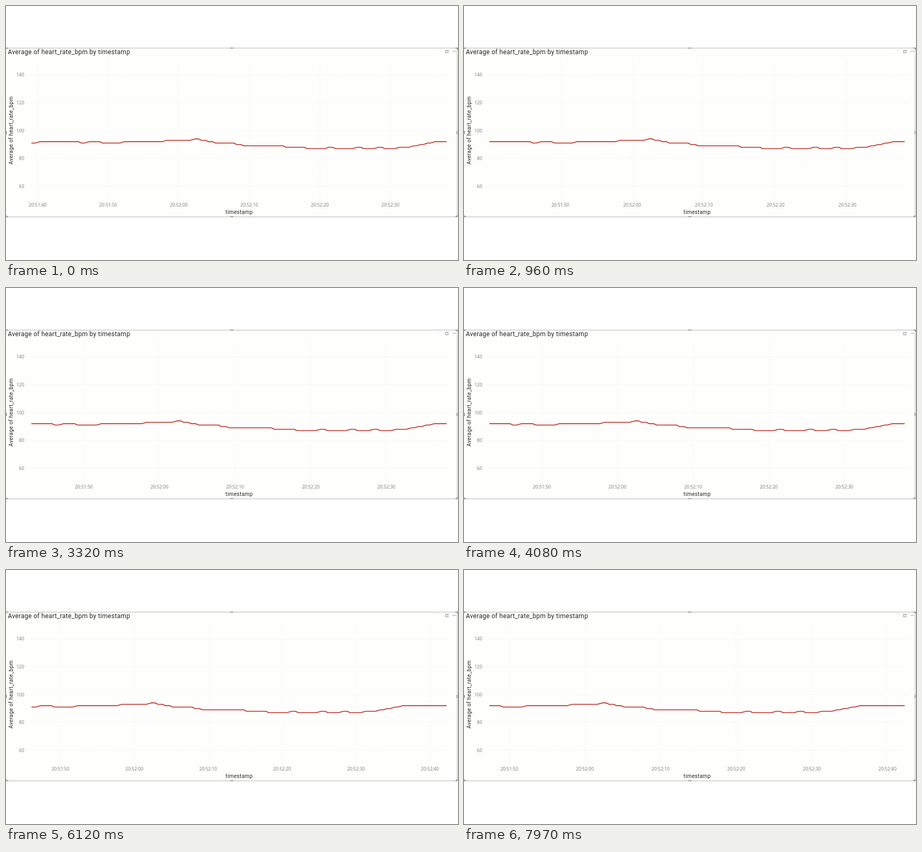
Animation, 853 px wide and 480 px high, one loop 8 s. Source, as an HTML page:

```html
<!DOCTYPE html>
<html lang="en">
<head>
<meta charset="utf-8">
<title>Heart rate</title>
<style>
  html, body { margin: 0; width: 100%; height: 100%; overflow: hidden; background: #fff; }
  svg { display: block; }
  text { fill: #252423; font-family: Roboto, sans-serif; }
  .title { font-size: 12px; letter-spacing: .3px; }
  .name { font-size: 10px; letter-spacing: .38px; text-anchor: middle; }
  .axis { font: 8.5px "Open Sans", "Noto Sans", sans-serif; fill: #777; }
  .grid { stroke: #e6e6e2; stroke-dasharray: 1 4; }
  .line { fill: none; stroke: #b92c22; stroke-width: 1.6; stroke-linejoin: round; stroke-linecap: round; }
  .icon { fill: none; stroke: #777; stroke-width: .8; }
</style>
</head>
<body>
<svg width="853" height="480" viewBox="0 0 853 480">
  <path d="M0 79.5H851.5V398.5H0" fill="#fefefd" stroke="#b5b5b5"/>
  <path d="M0 82V79.5H4M848 79.5H852V82M423 79.5H429M423 398.3H429M0 395V398.3H4M848 398.3H851.3V395M851.3 236V242M.5 236V242"
    fill="none" stroke="#808080" stroke-width="1.6"/>
  <path class="icon" d="M832 83.5H829.5V88.5H834.5V86.5M831.5 86.5L834.5 83.5M832.5 83.5H834.5V85.5"/>
  <path class="icon" d="M815 83.5H822" opacity=".18"/>
  <path d="M843 85.5H849" stroke="#555" stroke-dasharray="1.2 1.2"/>
  <text class="title" x="3.5" y="90.8">Average of heart_rate_bpm by timestamp</text>
  <text class="name" transform="translate(13 235) rotate(-90)">Average of heart_rate_bpm</text>
  <text class="name" x="440" y="393">timestamp</text>
  <g id="plot"></g>
</svg>
<script>
const LOOP = 8000, LEFT = 48.5, RIGHT = 831;

// Times are in seconds around 20:52:00; the rate moves by 1 bpm at these.
const rises = [-20, -13, -8, -2, 2, 21, 25, 28, 31, 33, 34, 35, 36];
const falls = [-14, -11, 3, 4, 5, 8, 9, 15, 18, 22, 26, 29];
const ramps = [
  ...rises.map(s => ({ start: s - .35, end: s + .3, change: 1 })),
  ...falls.map(s => ({ start: s - .2, end: s + .2, change: -1 }))
];
const corners = ramps.flatMap(r => [r.start, r.end]).sort((a, b) => a - b);

// Refresh moment in ms and the seconds scrolled off by then.
const refreshes = [[0, 0], [200, 1], [1020, 1.95], [3060, 3.95], [4680, 4.95], [5990, 6.95], [7320, 8.25]];

const plot = document.getElementById("plot");
const clamp = v => Math.min(1, Math.max(0, v));
const bpm = s => ramps.reduce((sum, r) => sum + r.change * clamp((s - r.start) / (r.end - r.start)), 91);
const yOf = v => 130.3 + (140 - v) * 2.6275;
const pixel = v => Math.floor(v) + .5;
const label = (text, x, y, anchor) =>
  `<text class="axis" text-anchor="${anchor}" x="${x}" y="${y}">${text}</text>`;
const clock = s => `20:${s < 0 ? 51 : 52}:${String((s + 60) % 60).padStart(2, "0")}`;

function draw(scrolled) {
  const from = scrolled - 20.84;
  const to = scrolled > 4.5 ? 42.23 : 37.93;   // new samples arrive late
  const xOf = s => LEFT + (s - from) / (to - from) * (RIGHT - LEFT);
  let grid = "", labels = "";
  for (let v = 60; v <= 140; v += 20) {
    grid += `M41 ${pixel(yOf(v))}H838`;
    labels += label(v, 34.3, yOf(v) + 3.1, "end");
  }
  for (let s = Math.ceil(from / 10) * 10; s <= to; s += 10) {
    grid += `M${pixel(xOf(s))} 104V366`;
    labels += label(clock(s), xOf(s), 379.2, "middle");
  }
  const line = [
    [from, Math.round(bpm(from))],
    ...corners.filter(s => s > from && s < to).map(s => [s, bpm(s)]),
    [to, bpm(to)]
  ].map(([s, v]) => `${xOf(s)},${yOf(v)}`).join(" ");
  plot.innerHTML = `<path class="grid" d="${grid}"/>${labels}<polyline class="line" points="${line}"/>`;
}

let current;
function tick() {
  const ms = performance.now() % LOOP;
  const refresh = refreshes.filter(r => r[0] <= ms).pop();
  if (refresh !== current) {
    current = refresh;
    draw(refresh[1]);
  }
  requestAnimationFrame(tick);
}
tick();
</script>
</body>
</html>
```
